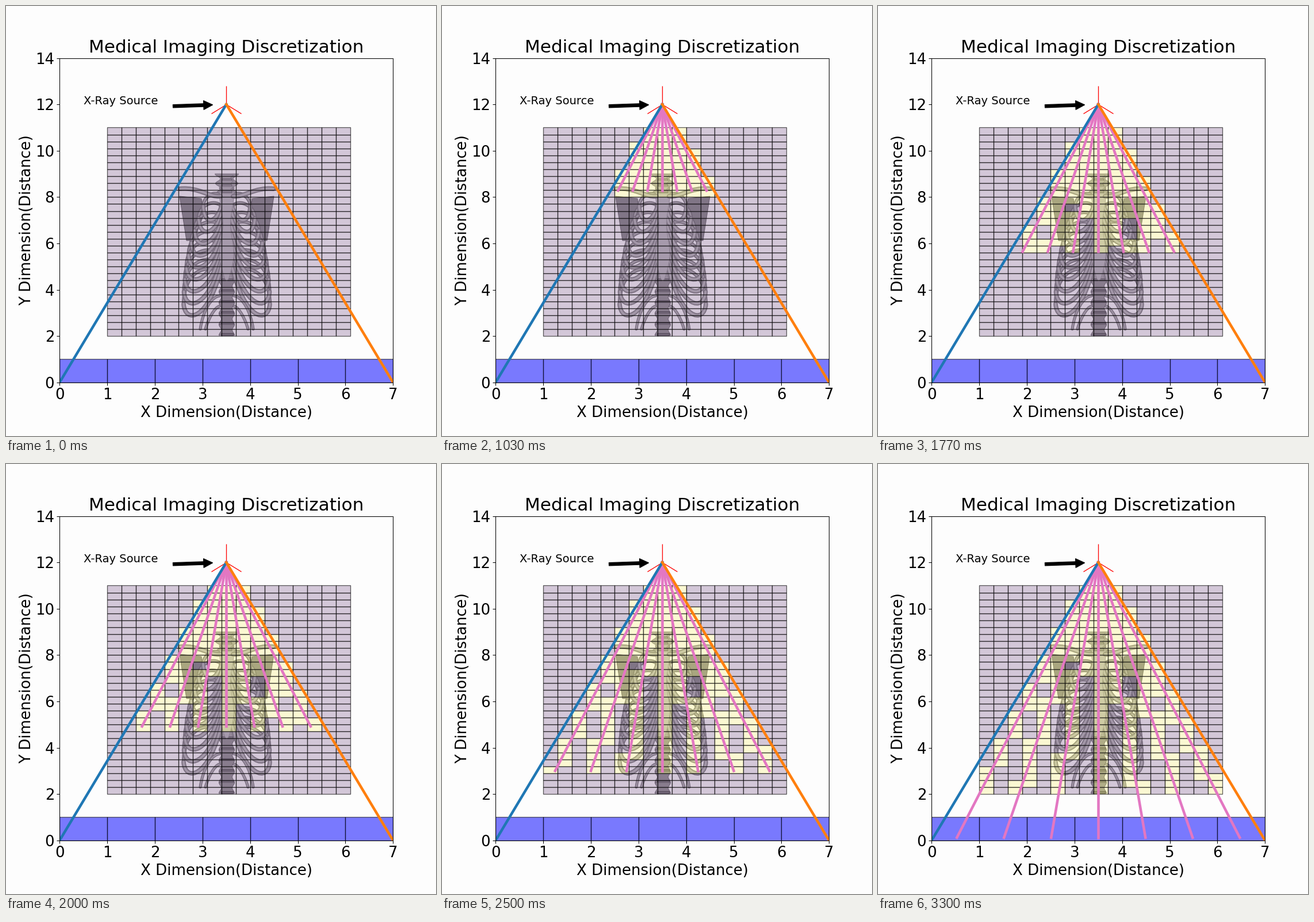
These frames come from a looping animation (748x748 px, 3.33 s). A matplotlib script:

```python
import numpy as np
import matplotlib.pyplot as plt
from matplotlib.animation import FuncAnimation
from matplotlib.collections import PolyCollection
from matplotlib.patches import PathPatch, Polygon
from matplotlib.path import Path
from matplotlib.transforms import Affine2D

SIZE, DPI = 748, 93.5
PT = 72 / DPI
LEFT, RIGHT, TOP, BASE = 93.3, 673.2, 90.55, 654.7
MID = 384
LOOP, TICK, STEPS = 3330, 30, 100
CELL, COLS, ROWS = 0.3, 17, 30
SOURCE = np.array([3.5, 12.0])
PAPER = "#fdfdfd"
PURPLE = (0.665, 0.575, 0.71, 0.5)
YELLOW = (0.985, 0.96, 0.66, 0.5)
EDGE = (0, 0, 0, 0.62)

fig = plt.figure(figsize=(SIZE / DPI, SIZE / DPI), dpi=DPI, facecolor=PAPER)
ax = fig.add_axes([LEFT / SIZE, 1 - BASE / SIZE,
                   (RIGHT - LEFT) / SIZE, (BASE - TOP) / SIZE], facecolor=PAPER)
ax.set(xlim=(0, 7), ylim=(0, 14), xticks=range(8), yticks=range(0, 15, 2))
ax.tick_params(labelsize=20)
ax.set_title("Medical Imaging Discretization", fontsize=24, pad=7)
ax.set_xlabel("X Dimension(Distance)", fontsize=20)
ax.set_ylabel("Y Dimension(Distance)", fontsize=20, labelpad=1.5)

# Stage pixels measured from the body's midline, y down, to axes data
body = (Affine2D().translate(MID - LEFT, -BASE)
        .scale(7 / (RIGHT - LEFT), -14 / (BASE - TOP)) + ax.transData)


def gray(tone):
    return str(min(max(tone, 0), 1))


def plate(pts, tone, z):
    ax.add_patch(Polygon(pts, facecolor=gray(tone), edgecolor=gray(tone - 0.22),
                         lw=PT, transform=body, zorder=z))


def column(top, bottom, half, tone, z):
    """Symmetric plate; half(t) is its half width from top to bottom."""
    t = np.linspace(0, 1, 30)
    x, y = half(t), top + (bottom - top) * t
    plate(np.column_stack([np.r_[x, -x[::-1]], np.r_[y, y[::-1]]]), tone, z)


def bone(pts, width, tone, z):
    """Mirrored pair of shaded cubic strokes."""
    codes = [Path.MOVETO] + [Path.CURVE4] * 3
    for side in (-1, 1):
        path = Path(np.array(pts) * (side, 1), codes)
        for scale, shade in ((1, -0.25), (0.65, 0), (0.25, 0.15)):
            ax.add_patch(PathPatch(path, fill=False, edgecolor=gray(tone + shade),
                                   lw=width * scale * PT, capstyle="round",
                                   transform=body, zorder=z))


def spine(top, bottom, count, half, tone, z):
    edges = np.linspace(top, bottom, count + 1)
    for y0, y1 in zip(edges, edges[1:]):
        column(y0, y1, lambda t: half + 2 * np.cos(2 * np.pi * t), tone, z)
        column(y1 - 4, y1, lambda t: half - 1 + 0 * t, tone - 0.2, z)


def draw_skeleton():
    for side in (-1, 1):
        blade = np.array([(82, 331), (44, 335), (41, 365), (57, 408), (70, 408)])
        plate(blade * (side, 1), 0.34, 0.1)

    for t in np.linspace(0, 1, 9):
        reach = 75 - 34 * (1 - t) ** 2
        spine_y, side_y, front_y = 332 + 130 * t, 348 + 170 * t, 344 + 104 * t
        bone([(8, spine_y), (reach / 2, spine_y - 14),
              (reach, spine_y), (reach, side_y)], 6, 0.42, 0.2)
        bone([(reach, side_y), (reach - 2, side_y + 36),
              (reach * 0.4, side_y + 30), (8, front_y)], 7.5, 0.5, 0.4)

    spine(316, 478, 10, 11, 0.5, 0.3)
    spine(478, 573, 5, 11.5, 0.4, 0.5)
    for drop in (0, 18):
        reach = 46 - drop / 2
        bone([(12, 504 + drop), (reach * 0.6, 506 + drop),
              (reach * 0.9, 530 + drop), (reach, 562)], 5, 0.45, 0.45)

    column(326, 479, lambda t: (9.5 + 3 * np.cos(9 * t)) * np.sqrt(1 - t**8),
           0.64, 0.6)
    bone([(11, 331), (30, 333), (48, 315), (81, 318)], 8, 0.52, 0.7)
    column(292, 324, lambda t: 16 + 4.5 * np.cos(12 * t) - 2 * t, 0.5, 0.6)
    spine(294, 324, 3, 9, 0.58, 0.6)


def boxes(xs, ys, w, h):
    return [[(x, y), (x + w, y), (x + w, y + h), (x, y + h)]
            for y in ys for x in xs]


def add_boxes(verts, color):
    grid = PolyCollection(verts, facecolors=[color], edgecolors=[EDGE],
                          linewidths=1, zorder=1)
    return ax.add_collection(grid, autolim=False)


draw_skeleton()

col_x = 1 + CELL * np.arange(COLS)
row_y = 2 + CELL * np.arange(ROWS)
cells = add_boxes(boxes(col_x, row_y, CELL, CELL), PURPLE)
add_boxes(boxes(range(7), [0], 1, 1), (0, 0, 1, 0.52))

ax.plot(*SOURCE, "2", color="red", ms=50, mew=1, zorder=2)
rays = [ax.plot([], [], color="#e377c2", lw=3.5, zorder=2.1)[0]
        for _ in range(7)]
ax.plot([0, 3.5], [0, 12], color="#1f77b4", lw=3.5, zorder=2.2)
ax.plot([3.5, 7], [12, 0], color="#ff7f0e", lw=3.5, zorder=2.2)
ax.annotate("X-Ray Source", xy=SOURCE, xytext=(0.5, 12), fontsize=15,
            arrowprops=dict(facecolor="black", shrink=0.2))

targets = np.column_stack([np.arange(7) + 0.5, np.zeros(7)])


def ray_tips(step):
    return SOURCE + (targets - SOURCE) * step / STEPS


# Step at which a ray tip first enters each cell
hit_step = np.full((ROWS, COLS), STEPS)
for step in reversed(range(STEPS)):
    for x, y in ray_tips(step):
        in_col = (col_x - 1e-9 <= x) & (x <= col_x + CELL + 1e-9)
        in_row = (row_y <= y) & (y < row_y + CELL)
        hit_step[np.outer(in_row, in_col)] = step
hit_step = hit_step.ravel()


def update(frame):
    # Steps are slightly longer than ticks, so sample each tick at its middle
    step = int((frame + 0.5) * TICK * STEPS / LOOP)
    for ray, (x, y) in zip(rays, ray_tips(step)):
        ray.set_data([SOURCE[0], x], [SOURCE[1], y])
    lit = (hit_step <= step)[:, None]
    cells.set_facecolor(np.where(lit, YELLOW, PURPLE))
    return [*rays, cells]


anim = FuncAnimation(fig, update, frames=LOOP // TICK, interval=TICK,
                     repeat=True, repeat_delay=0, blit=False)
plt.show()
```
